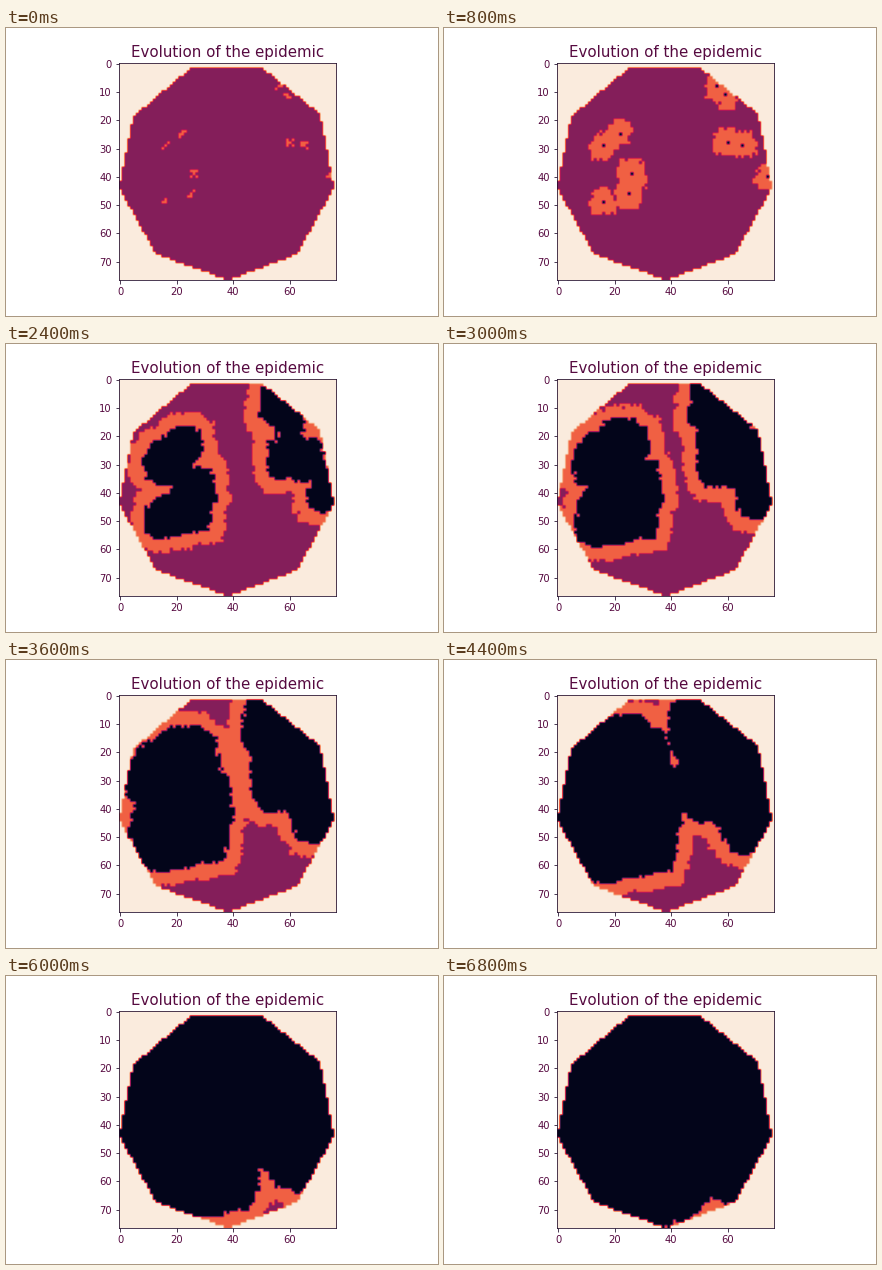
These frames come from a looping animation (432 by 288 pixels, 7000 ms). A matplotlib script:

```python
import numpy as np
import matplotlib.pyplot as plt
from matplotlib.animation import FuncAnimation
from matplotlib.colors import LinearSegmentedColormap

SIZE, FRAMES, INTERVAL = 77, 35, 200
SICK_FOR = 5        # frames a cell stays infected
P_CONTACT = 0.5     # chance of infection per sick neighbour
DEAD, HEALTHY, SICK, OUTSIDE = range(4)
NEVER = 999
TEXT, LINE = "#560a40", "#220d2c"

COMPASS = {"N": (0, -1), "NE": (1, -1), "E": (1, 0), "SE": (1, 1),
           "S": (0, 1), "SW": (-1, 1), "W": (-1, 0), "NW": (-1, -1)}

# first cases, and the neighbours each one has infected at the start
CASES = [(56, 8, "SW E"), (59, 11, "W S SE"), (22, 25, "N NE W SW"),
         (16, 29, "NE SW"), (60, 28, "NW NE W SW SE"),
         (65, 29, "NW N NE W SE"), (26, 39, "NW N NE SW SE"),
         (25, 46, "NE SW S"), (16, 49, "N W"), (74, 40, "N W")]

CMAP = LinearSegmentedColormap.from_list("warm", [
    (0, "#03051a"), (1 / 7, "#35193e"), (2 / 7, "#701f57"),
    (1 / 3, "#841e5a"), (3 / 7, "#ad1759"), (4 / 7, "#e13342"),
    (2 / 3, "#f06043"), (5 / 7, "#f37651"), (6 / 7, "#f6b48f"),
    (1, "#faebdd")])


def nonagon():
    """Mask of the cells inside a nine-sided country."""
    mid = SIZE // 2
    angles = np.pi / 2 + np.arange(10) * 2 * np.pi / 9
    px = (mid + mid * np.cos(angles)).astype(int)
    py = (mid + mid * np.sin(angles)).astype(int)
    y, x = np.mgrid[:SIZE, :SIZE]
    inside = np.ones((SIZE, SIZE), bool)
    for x0, y0, x1, y1 in zip(px, py, px[1:], py[1:]):
        dx, dy = x1 - x0, y1 - y0
        side = dx * (y - y0) - dy * (x - x0)
        inside &= side >= -0.5 * max(abs(dx), abs(dy))
    return inside


def count_neighbours(mask):
    padded = np.pad(mask.astype(int), 1)
    return sum(padded[1 + dy:1 + dy + SIZE, 1 + dx:1 + dx + SIZE]
               for dx, dy in COMPASS.values())


def infection_times(inside):
    """Frame at which each cell falls ill."""
    rng = np.random.default_rng(7)
    born = np.full((SIZE, SIZE), NEVER)
    for x, y, spread in CASES:
        for name in spread.split():
            dx, dy = COMPASS[name]
            born[y + dy, x + dx] = 0
    for x, y, _ in CASES:
        born[y, x] = -1
    for t in range(1, FRAMES):
        sick = (born < t) & (born >= t - SICK_FOR)
        chance = 1 - (1 - P_CONTACT) ** count_neighbours(sick)
        caught = rng.random(born.shape) < chance
        born[caught & inside & (born == NEVER)] = t
    return born


inside = nonagon()
born = infection_times(inside)


def grid(t):
    cells = np.full((SIZE, SIZE), float(HEALTHY))
    cells[born <= t] = SICK
    cells[born <= t - SICK_FOR] = DEAD
    cells[~inside] = OUTSIDE
    return cells


plt.rcParams["font.family"] = "DejaVu Sans"
fig = plt.figure(figsize=(6, 4), dpi=72, facecolor="white")
fig.subplots_adjust(left=0.125, right=0.9, bottom=0.125, top=0.88)
ax = fig.add_subplot()
image = ax.imshow(grid(0), cmap=CMAP, vmin=DEAD, vmax=OUTSIDE)
ax.set_title("Evolution of the epidemic", fontsize=15, color=TEXT)
ax.set_xticks(range(0, SIZE, 20))
ax.set_yticks(range(0, SIZE, 10))
ax.tick_params(labelsize=10, color=LINE, labelcolor=TEXT)
for spine in ax.spines.values():
    spine.set_color(LINE)


def update(t):
    image.set_data(grid(t))
    return [image]


anim = FuncAnimation(fig, update, frames=FRAMES, interval=INTERVAL,
                     repeat=True, repeat_delay=0)
plt.show()
```
